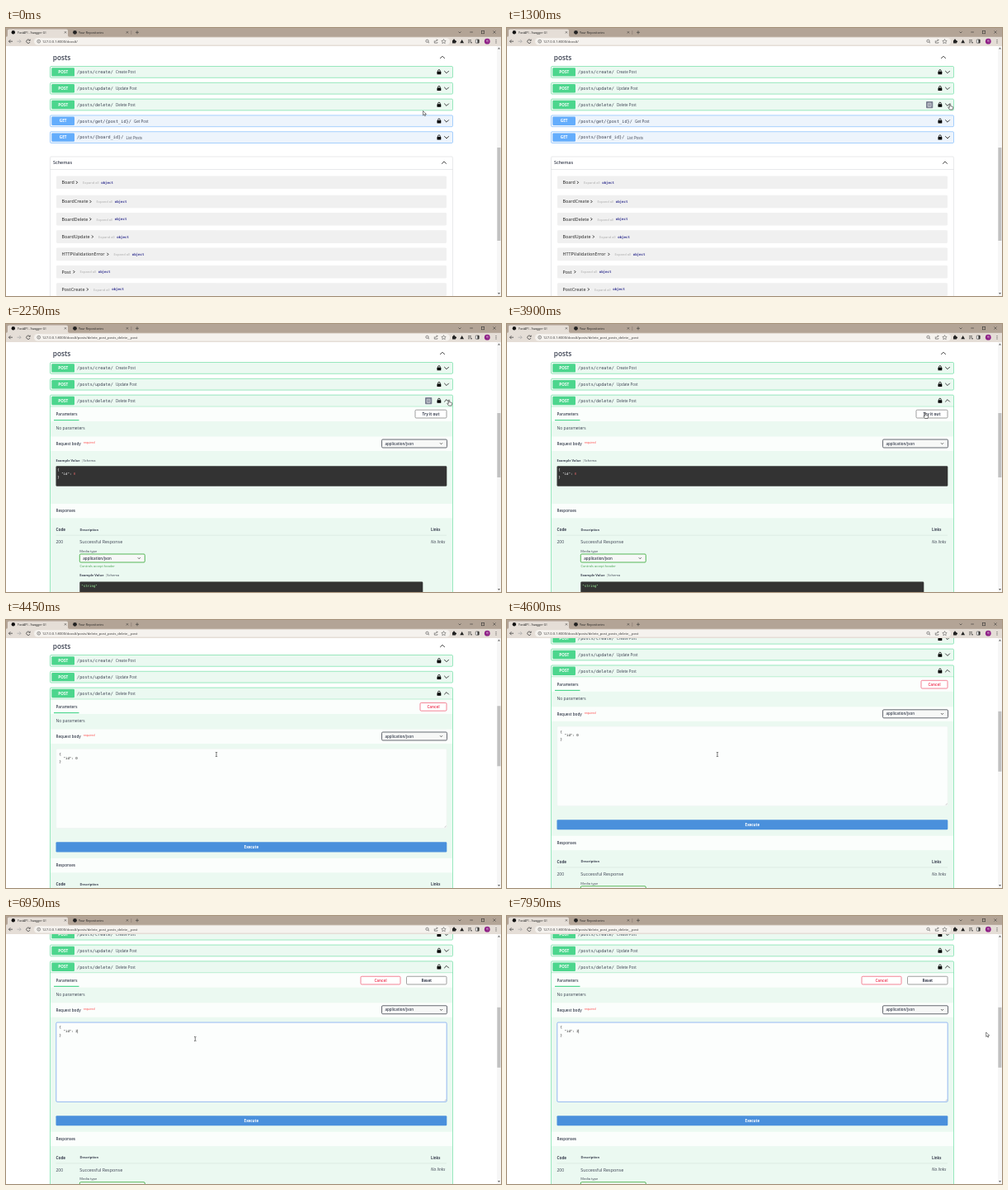
An HTML page for the animation above (8000 ms loop, 600 px wide and 325 px high).

```html
<!DOCTYPE html>
<html lang="en">
<head>
<meta charset="utf-8">
<title>API docs</title>
<style>
html, body { margin: 0; width: 100%; height: 100%; overflow: hidden; background: #fff; }
svg { display: block; width: 100%; height: 100%; }
text { font-family: "Open Sans", "Noto Sans", sans-serif; white-space: pre; }
.mono { font-family: "DejaVu Sans Mono", "Noto Sans Mono", monospace; }
</style>
</head>
<body>
<svg id="stage" viewBox="0 0 600 325" xmlns="http://www.w3.org/2000/svg"></svg>
<script>
const GREEN = '#4cd68d', BLUE = '#64adfc', INK = '#3b4151', RED = '#f0506a';

// ---- drawing helpers (text is placed by its vertical centre) ----
const text = (x, cy, size, str, { fill = INK, w = 400, mono, anchor = 'start', extra = '' } = {}) =>
  `<text x="${x}" y="${cy + size * 0.35}" font-size="${size}" fill="${fill}" font-weight="${w}" text-anchor="${anchor}" ${mono ? 'class="mono"' : ''} ${extra}>${str}</text>`;
const rect = (x1, y1, x2, y2, fill, stroke = 'none', r = 0, sw = 0.55) =>
  `<rect x="${x1}" y="${y1}" width="${x2 - x1}" height="${y2 - y1}" rx="${r}" fill="${fill}" stroke="${stroke}" stroke-width="${sw}"/>`;
const line = (d, stroke, sw = 0.55) => `<path d="${d}" fill="none" stroke="${stroke}" stroke-width="${sw}"/>`;
const dot = (x, y, r, fill) => `<circle cx="${x}" cy="${y}" r="${r}" fill="${fill}"/>`;
const group = (id, body) => `<g id="${id}">${body}</g>`;
const chevron = (x, y, up, s = 2.8, sw = 0.85) => {
  const h = up ? -s / 2 : s / 2;
  return line(`M${x - s} ${y - h}L${x} ${y + h}L${x + s} ${y - h}`, '#222', sw);
};
const lock = y => rect(522.5, y - 0.7, 527.3, y + 2.8, '#000', 'none', 0.5) +
  line(`M523.6 ${y - 0.5}v-1a1.3 1.3 0 0 1 2.6 0v1`, '#000', 0.8);
const button = (x1, x2, y1, y2, label, color) =>
  rect(x1, y1, x2, y2, '#fff', color, 1.3, 0.7) +
  text((x1 + x2) / 2, (y1 + y2) / 2, 4.6, label, { fill: color === RED ? RED : INK, w: 700, anchor: 'middle' });
const select = (x, y, color) =>
  rect(x, y, x + 79, y + 10, '#f7f8f7', color, 1.3, 0.8) +
  text(x + 4, y + 5, 4.45, 'application/json', { w: 600 }) +
  chevron(x + 72, y + 5, false, 1.5, 0.7);
const example = (x, y) => text(x, y, 4, 'Example Value', { w: 700 }) +
  text(x + 31, y, 4.1, '|', { fill: '#999' }) + text(x + 33, y, 4.1, 'Schema');
const bar = (y1, y2) => rect(54, y1, 541, y2, '#fbfefc');

// ---- page parts ----
function operation(cy, method, path, summary, open) {
  const color = method === 'POST' ? GREEN : BLUE;
  return rect(53.5, cy - 6.9, 541.5, open ? 600 : cy + 6.9, method === 'POST' ? '#ebf9f1' : '#edf4fc', color, 1.3) +
    rect(55.3, cy - 5.2, 83, cy + 5.2, color, 'none', 1.2) +
    text(69.2, cy, 4.7, method, { fill: '#fff', w: 700, anchor: 'middle' }) +
    text(86, cy, 5.21, path, { mono: true }) +
    text(86 + path.length * 3.14 + 3, cy + 0.4, 4.5, summary) +
    lock(cy) + chevron(534, cy, open);
}

const schemaRow = ([name, width], i) => {
  const y = i ? 210.5 + (i - 1) * 21.3 : 187.3;
  const x = 67.5 + width;
  return rect(61, y - 7.8, 534, y + 7.8, '#f0f0f0', 'none', 1.3) +
    text(67.5, y, 5.3, name, { w: 600, fill: '#505050' }) +
    line(`M${x + 2} ${y - 1.6}l1.6 1.6l-1.6 1.6`, '#222', 0.9) +
    text(x + 10, y + 0.3, 4.1, 'Expand all', { fill: '#aaa' }) +
    text(x + 32.2, y, 4.1, 'object', { fill: '#3a3a94', w: 700, mono: true });
};

const schemas = [['Board', 15.5], ['BoardCreate', 32], ['BoardDelete', 32], ['BoardUpdate', 34.5],
  ['HTTPValidationError', 53], ['Post', 12], ['PostCreate', 28.5]];

const closedView = operation(93, 'POST', '/posts/delete/', 'Delete Post') +
  operation(112.8, 'GET', '/posts/get/{post_id}/', 'Get Post') +
  operation(132.6, 'GET', '/posts/{board_id}/', 'List Posts') +
  rect(53.5, 156, 541.5, 400, '#fff', '#d5d7da', 1.4) +
  line('M53.5 171.5H541.5', '#d5d7da') +
  text(57, 163.3, 5.4, 'Schemas', { w: 600 }) + chevron(531, 163.3, true) +
  schemas.map(schemaRow).join('');

const white = { fill: '#fff', mono: true };
const sampleView = button(496, 534, 104.2, 114, 'Try it out', '#777') +
  example(60.5, 165.5) +
  rect(60.5, 172.3, 534.3, 196.7, '#333', 'none', 1.3) +
  text(62.3, 177, 4.05, '{', white) +
  text(62.3, 181.3, 4.05, '  "id": <tspan fill="#d36363">0</tspan>', white) +
  text(62.3, 185.8, 4.05, '}', white);

const code = { mono: true, fill: '#222' };
const editView = rect(60.8, 160.3, 534.2, 256.6, '#fcfefd', '#edf3f0', 1.3) +
  rect(60.8, 160.3, 534.2, 256.6, 'none', '#7eaaf0', 1.3, 0.8).replace('<rect', '<rect id="focus"') +
  line('M531.5 255.5l2-2M532.6 255.7l1-1', '#999', 0.4) +
  text(64.6, 166.3, 4.08, '{', code) +
  text(64.6, 171.2, 4.08, '', { ...code, extra: 'id="value"' }) +
  text(64.6, 175.9, 4.08, '}', code) +
  `<rect id="caret" width=".4" height="4.8" fill="#222"/>` +
  rect(60.5, 273.4, 534.3, 285.5, '#4a90dc', 'none', 1.2) +
  text(297.4, 279.5, 4.5, 'Execute', { fill: '#fff', w: 700, anchor: 'middle' }) +
  group('cancelOnly', button(502, 534, 104.5, 114.2, 'Cancel', RED)) +
  group('cancelReset', button(430, 478, 104.5, 114.2, 'Cancel', RED) + button(485.5, 534, 104.5, 114.2, 'Reset', '#777'));

const responses = bar(218, 235.3) + text(60.5, 226.5, 4.6, 'Responses', { w: 600 }) +
  text(60.5, 249.3, 4.7, 'Code', { w: 700 }) + text(89.5, 249.3, 3.95, 'Description', { w: 700 }) +
  text(515, 249.3, 4.3, 'Links', { w: 700 }) + line('M60.5 256.2H534', '#c6d5cd', 0.4) +
  text(60.5, 264, 5, '200') + text(89.3, 264, 5.4, 'Successful Response') +
  text(515, 264, 4.9, 'No links', { extra: 'font-style="italic"' }) +
  text(89.3, 275.3, 4.07, 'Media type') + select(89.3, 279, '#2fa52f') +
  text(89.5, 293.3, 3.93, 'Controls accept header', { fill: '#3f9f4a' }) +
  example(89.3, 304.3) + rect(89.3, 312.5, 505.3, 336, '#333', 'none', 1.3) +
  text(91.3, 317.3, 4.05, '"string"', { fill: '#a2fca2', mono: true });

const openView = operation(93, 'POST', '/posts/delete/', 'Delete Post', true) +
  line('M53.5 100.2H541.5', GREEN, 0.45) +
  bar(100.5, 118) + text(60.5, 109.5, 4.65, 'Parameters', { w: 600 }) +
  rect(58, 116, 88.5, 117.2, GREEN) +
  text(60.5, 126.6, 5, 'No parameters') +
  bar(136.5, 154) + text(60.5, 145.4, 4.6, 'Request body', { w: 600 }) +
  text(94, 143.8, 3.4, 'required', { fill: '#f33' }) + select(455.5, 140, '#41444e') +
  group('sample', sampleView) + group('edit', editView) + group('responses', responses);

const page = text(56.8, 35.8, 8.3, 'posts', { w: 600 }) + chevron(529, 35.6, true) +
  operation(53.4, 'POST', '/posts/create/', 'Create Post') +
  operation(73.2, 'POST', '/posts/update/', 'Update Post') +
  group('closed', closedView) + group('open', openView) +
  group('copy', rect(508, 89, 516.3, 97.3, '#7d8293', 'none', 1) +
    rect(510.2, 91.2, 514, 95.4, 'none', '#fff', 0.4, 0.6) + line('M511.2 92.8h2M511.2 94h2', '#fff', 0.4));

const cross = (x, y, s = 1.2) => line(`M${x - s} ${y - s}l${2 * s} ${2 * s}m0 ${-2 * s}l${-2 * s} ${2 * s}`, '#333', 0.5);
const browser = rect(0, 0, 600, 11, '#b3a496') +
  `<path d="M0 11Q2 11 2 9V3Q2 1.5 4 1.5H73Q75 1.5 75 3V9Q75 11 77 11Z" fill="#e5ded7"/>` +
  rect(0, 10.8, 600, 22, '#e5ded7') + rect(34, 12, 538, 20.6, '#f5f2ee', 'none', 4.3) +
  dot(8.8, 5.3, 2.2, '#111') + text(14, 5.3, 3.65, 'FastAPI - Swagger UI', { fill: '#222' }) + cross(72, 5.3) +
  dot(83.5, 5.3, 2.4, '#222') + text(88, 5.3, 3.7, 'Your Repositories', { fill: '#222' }) + cross(147, 5.3) +
  line('M151.8 3v5', '#7d7065', 0.5) + line('M157 5.3h4M159 3.3v4', '#333', 0.6) +
  line('M548.5 4.5l1.5 1.5l1.5-1.5M562.3 5h3.6', '#333', 0.6) + rect(576.3, 3.4, 579.7, 6.8, 'none', '#333', 0, 0.6) + cross(592, 5, 1.6) +
  line('M8 16.2H3.4m2-2l-2 2l2 2', '#444', 0.8) + line('M13.5 16.2h4.6m-2-2l2 2l-2 2', '#aaa', 0.8) +
  line('M28.6 14.8a2.2 2.2 0 1 0 .4 2.2m.2-3.3v1.6h-1.6', '#444', 0.8) +
  `<circle cx="39.7" cy="16.2" r="1.9" fill="none" stroke="#555" stroke-width=".6"/>` + line('M39.7 15.9v1.3M39.7 14.9v.5', '#555', 0.5) +
  text(44, 16.2, 4.15, '', { fill: '#333', extra: 'id="url"' }) +
  `<circle cx="510.5" cy="15.8" r="1.6" fill="none" stroke="#444" stroke-width=".6"/>` + line('M511.7 17l1.3 1.3', '#444', 0.7) +
  line('M519.3 15.4v2.7h3.6v-1M520.5 16.6q.3-2 2.5-2m-.9-1l1 1l-1 1', '#444', 0.6) +
  `<path d="M530.5 13.6l.8 1.7 1.9.2-1.4 1.3.4 1.9-1.7-1-1.7 1 .4-1.9-1.4-1.3 1.9-.2z" fill="none" stroke="#444" stroke-width=".5"/>` +
  rect(541, 14.7, 545, 18.5, '#222', 'none', 0.5) + dot(543, 14.4, 1, '#222') + dot(545.2, 16.5, 0.9, '#222') +
  `<path d="M550.3 18.2l2.4-4.2 2.3 4.2z" fill="#222"/>` +
  line('M560 14.6h4M560 16.2h4M560 17.8h2', '#333', 0.6) + dot(564, 17.7, 0.8, '#333') +
  rect(569.3, 14, 573.3, 18.2, '#fff', '#333', 0.6, 0.6) + rect(571.4, 14, 573.3, 18.2, '#333') +
  dot(583.3, 16.2, 3.4, '#8e1f86') + text(583.3, 16.2, 2.8, 'HJ', { fill: '#fff', anchor: 'middle' }) +
  [14.4, 16.2, 18].map(y => dot(594, y, 0.5, '#333')).join('');

const scrollbar = rect(595, 22, 600, 325, '#f6f6f6') +
  `<path d="M596 25.5l1.5-2 1.5 2zM596 321l1.5 2 1.5-2z" fill="#666"/>` +
  `<rect id="thumb" x="595.4" width="4" fill="#c1c1c1"/>`;

const pointers = group('arrow', `<path d="M0 0V5.4L1.3 4.3L2.2 6.2L3 5.8L2.2 4H4Z" fill="#fff" stroke="#111" stroke-width=".5"/>`) +
  group('hand', `<path d="M-.7 .6Q-.7 0 0 0T.7 .6V2.8L3 3.3Q3.9 3.6 3.7 4.5L3 7H-.4L-2.2 4.6Q-2.2 3.8-1.4 4L-.7 4.6Z" fill="#fff" stroke="#111" stroke-width=".55"/>`) +
  group('beam', line('M-1.2-2.6Q0-2.6 0-2V2Q0 2.6-1.2 2.6M1.2-2.6Q0-2.6 0-2M0 2Q0 2.6 1.2 2.6', '#222', 0.6));

document.getElementById('stage').innerHTML =
  `<clipPath id="view"><rect y="22" width="600" height="303"/></clipPath><rect width="600" height="325" fill="#fff"/>` +
  `<g clip-path="url(#view)">${group('page', page)}</g>` + scrollbar + browser + group('pointer', pointers);

// ---- motion ----
const el = id => document.getElementById(id);
const show = (id, on) => el(id).setAttribute('display', on ? 'inline' : 'none');
const move = (id, x, y) => el(id).setAttribute('transform', `translate(${x} ${y})`);
const set = (id, attrs) => Object.entries(attrs).forEach(([k, v]) => el(id).setAttribute(k, v));
const write = (id, str) => { if (el(id).textContent !== str) el(id).textContent = str; };
const ease = u => { u = Math.min(1, Math.max(0, u)); return u * u * (3 - 2 * u); };

const OPEN = 1950, TRY = 3950, FOCUS = 5000, ERASE = 6800, TYPE = 6950;
// time, x, y of the pointer
const route = [[500, 505.5, 100.5], [1300, 537, 92], [2550, 537, 92], [3350, 507, 107.5], [3900, 507, 107.5],
  [4450, 255, 163], [4750, 255, 163], [5150, 229.3, 149], [7150, 229.3, 149], [7600, 470, 152], [7800, 568, 154], [7950, 580.7, 141]];

function pointerAt(t) {
  const i = route.findIndex(p => p[0] > t);
  if (i === 0) return route[0].slice(1);
  if (i < 0) return route[route.length - 1].slice(1);
  const [t0, x0, y0] = route[i - 1], [t1, x1, y1] = route[i];
  const u = ease((t - t0) / (t1 - t0));
  return [x0 + (x1 - x0) * u, y0 + (y1 - y0) * u];
}

function draw(t) {
  const open = t >= OPEN, editing = t >= TRY, scroll = 31.25 * ease((t - 4405) / 200);
  const [x, y] = pointerAt(t);

  show('closed', !open);
  show('open', open);
  show('sample', !editing);
  show('edit', editing);
  show('cancelOnly', t < ERASE);
  show('cancelReset', t >= ERASE);
  move('responses', 0, editing ? 75 : 0);
  move('page', 0, -scroll);
  write('url', '127.0.0.1:8000/docs#/' + (open ? 'posts/delete_post_posts_delete__post' : ''));
  write('value', '  "id": ' + (t < ERASE ? '0' : t < TYPE ? '' : '2'));

  const [top, height] = editing ? [103.3 + scroll * 0.24, 73] : open ? [108, 78] : [145, 113];
  set('thumb', { y: top, height });

  // caret: end of last line, then up, then to the end of the value
  const row = t < 6200 ? 2 : 1;
  const column = t < 6350 ? 1 : t >= ERASE && t < TYPE ? 8 : 9;
  show('focus', t >= FOCUS);
  show('caret', t >= FOCUS && !(t >= 5300 && t < 5800));
  set('caret', { x: 64.6 + column * 2.45, y: 164.1 + row * 4.7 });

  const overRow = t < TRY && y < 100 && y > 86;
  const overButton = open && t < TRY + 50 && x > 496 && x < 534 && y > 104 && y < 114;
  const overText = editing && x > 61 && x < 534 && y + scroll > 160;
  const shape = overRow || overButton ? 'hand' : overText ? 'beam' : 'arrow';
  ['arrow', 'hand', 'beam'].forEach(id => show(id, id === shape));
  show('copy', overRow);
  move('pointer', x, y);
}

function tick() {
  draw(Math.floor(performance.now() % 8000 / 50) * 50);
  requestAnimationFrame(tick);
}
tick();
</script>
</body>
</html>
```
